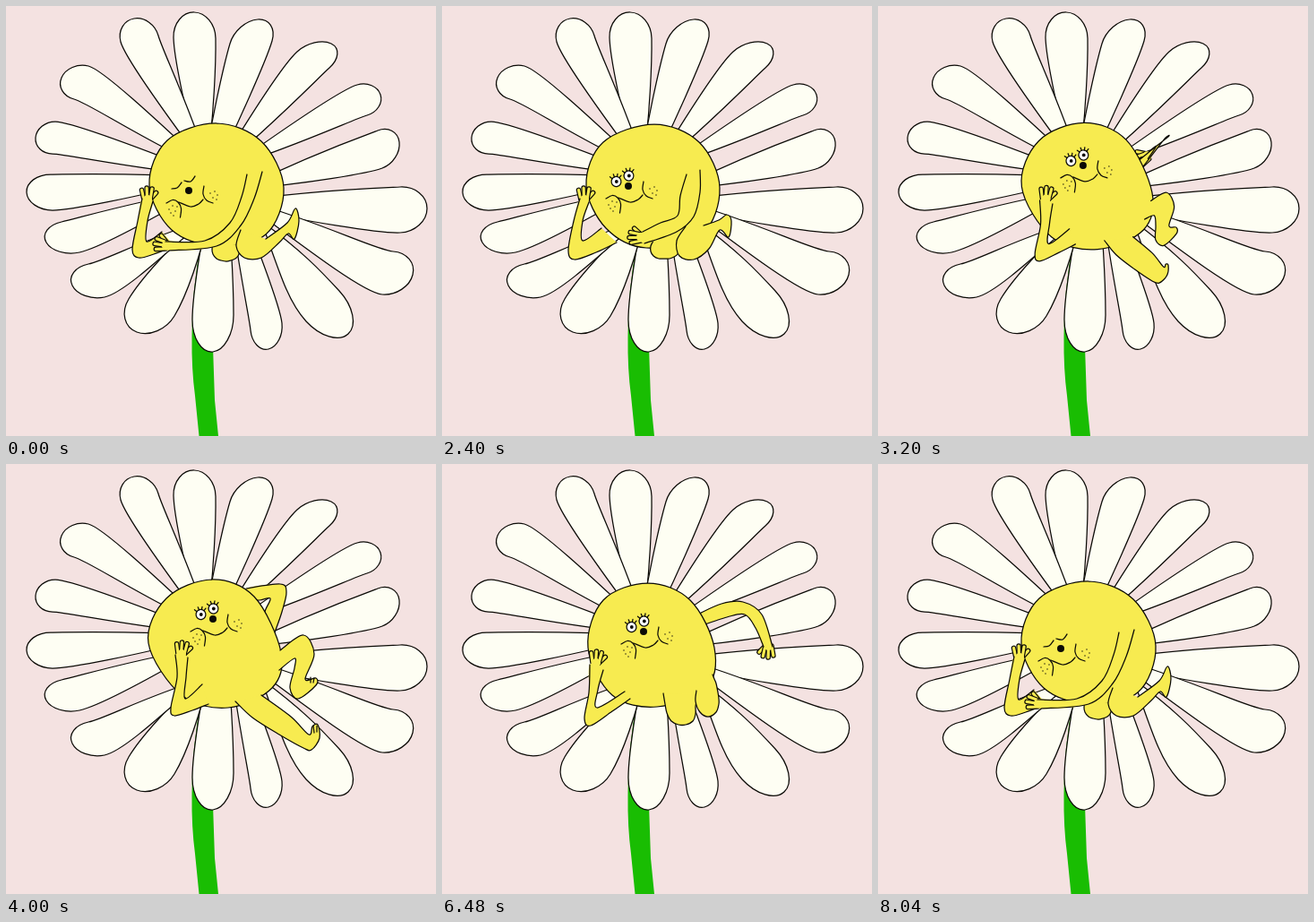
An HTML page with a canvas that plays this animation: 480 px wide and 480 px high, repeating every 9.44 s.

```html
<!DOCTYPE html>
<html lang="en">
<head>
<meta charset="utf-8">
<title>Daisy</title>
<style>
html, body { margin: 0; width: 100%; height: 100%; overflow: hidden; background: #f4e2e1; }
canvas { display: block; width: 100vw; height: 100vh; }
</style>
</head>
<body>
<canvas id="stage" width="480" height="480"></canvas>
<script>
const ctx = document.getElementById('stage').getContext('2d');
const LOOP = 9440;
const INK = '#0b0a06', YELLOW = '#f7eb50', PETAL = '#fefef3', GREEN = '#19bd02', BG = '#f4e2e1';

// Each petal: root, one shoulder, tip, other shoulder
const petals = [
  [222,200, 187,35, 210,7, 234,36],
  [215,220, 250,42, 281,15, 297,39],
  [235,185, 325,51, 363,42, 361,69],
  [250,180, 392,88, 418,99, 403,122],
  [260,205, 415,139, 439,152, 420,181],
  [240,220, 440,202, 470,226, 440,253],
  [260,215, 432,274, 454,300, 420,322],
  [285,240, 372,318, 382,366, 335,352],
  [245,180, 308,354, 293,383, 273,362],
  [240,150, 254,345, 231,386, 208,350],
  [230,225, 188,346, 146,364, 137,327],
  [220,240, 110,325, 74,312, 92,288],
  [220,205, 82,275, 45,264, 62,241],
  [230,192, 52,228, 23,208, 50,188],
  [230,190, 52,165, 33,147, 55,129],
  [230,185, 76,104, 62,80, 92,67],
  [230,190, 128,40, 143,14, 170,33]
];

// Poses share point counts, so any two can be blended
const asleep = {
  body: [235,131, 285,151, 310,203, 290,255, 235,268, 185,250, 160,200, 180,150],
  legL: [232,264, 230,271, 231,277, 235,282, 240,284, 246,285, 251,284, 256,282, 259,279, 261,274, 262,267],
  legR: [262,250, 257,268, 266,281, 285,281, 305,264, 315,254, 322,260, 327,240, 323,226, 314,242, 290,260],
  armL: [188,268, 165,277, 148,281, 141,272, 147,240, 152,215, 164,218, 158,240, 157,263, 174,252],
  armR: [286,185, 277,215, 262,245, 235,268, 182,273, 178,263, 222,262, 250,242, 263,213, 269,188],
  handL: [158,216, -1.6], handR: [179,267, 3.3], nose: [204,206]
};
const awake = {
  body: [237,132, 287,152, 310,203, 290,255, 228,270, 183,248, 161,200, 180,152],
  legL: [236,262, 233,268, 233,274, 236,279, 242,282, 248,282, 254,282, 259,280, 263,277, 265,271, 266,264],
  legR: [272,246, 262,262, 265,279, 281,283, 298,271, 310,250, 320,258, 323,240, 318,233, 309,239, 292,245],
  armL: [195,264, 172,275, 148,283, 141,273, 147,240, 154,215, 164,219, 157,240, 157,262, 178,248],
  armR: [288,183, 288,208, 281,235, 262,252, 226,265, 224,252, 244,242, 263,234, 266,212, 273,188],
  handL: [159,216, -1.6], handR: [222,258, 3.14], nose: [208,201]
};
const stretch = {
  body: [230,133, 277,152, 304,205, 295,250, 240,271, 190,258, 163,205, 180,152],
  legL: [247,256, 249,268, 251,278, 256,287, 264,291, 272,291, 280,287, 283,279, 283,271, 284,264, 284,257],
  legR: [284,253, 283,265, 288,277, 297,282, 306,277, 309,268, 309,262, 308,255, 306,245, 304,240, 302,235],
  armL: [210,262, 190,276, 166,292, 159,284, 164,255, 165,224, 180,230, 174,252, 173,272, 204,254],
  armR: [285,168, 312,156, 336,154, 357,168, 369,204, 359,204, 350,183, 338,168, 318,171, 285,182],
  handL: [172,222, -1.5], handR: [364,203, 1.6], nose: [225,187]
};
const lounge = {
  body: [230,129, 277,148, 307,210, 297,250, 248,272, 196,258, 159,200, 179,150],
  legL: [256,265, 275,283, 305,302, 332,317, 341,319, 350,306, 348,291, 342,293, 338,302, 318,282, 285,258],
  legR: [305,230, 322,217, 322,228, 317,250, 326,262, 346,247, 346,239, 334,240, 344,212, 332,191, 306,208],
  armL: [226,268, 208,275, 188,281, 184,272, 191,238, 189,213, 203,216, 201,238, 200,262, 219,246],
  armR: [300,188, 308,165, 313,143, 306,134, 268,139, 270,152, 283,152, 295,150, 290,162, 285,175],
  handL: [196,212, -1.5], handR: [266,148, 3.14], nose: [231,173]
};
const poses = [asleep, awake, stretch, lounge];

const poseKeys = [[0,0],[40,0],[1000,1],[2400,1],[2860,2],[2960,2],[3360,3],[5720,3],[6360,2],[6520,2],[6840,1],[7560,0],[LOOP,0]];
const eyeKeys = [[0,0],[600,0],[760,1],[1880,1],[1960,0],[2080,0],[2200,1],[3400,1],[3480,0],[3560,0],[3680,1],
  [4280,1],[4400,0],[4520,0],[4640,1],[4920,1],[5000,0],[5080,0],[5160,1],[5320,1],[5400,.6],[5760,.6],[5900,1],[6900,1],[7060,0],[LOOP,0]];

const mix = (a, b, k) => a + (b - a) * k;
const ease = k => k * k * (3 - 2 * k);

function track(keys, t) {
  let i = 0;
  while (i < keys.length - 2 && t >= keys[i + 1][0]) i++;
  const [t0, a] = keys[i], [t1, b] = keys[i + 1];
  return mix(a, b, ease((t - t0) / (t1 - t0)));
}

function blend(p) {
  const i = Math.min(2, Math.floor(p)), a = poses[i], b = poses[i + 1], out = {};
  for (const part in a) out[part] = a[part].map((v, n) => mix(v, b[part][n], p - i));
  return out;
}

// Smooth curve through flat x,y pairs
function curve(v, closed) {
  const n = v.length / 2;
  const at = i => {
    i = closed ? (i + n) % n : Math.max(0, Math.min(n - 1, i));
    return [v[2 * i], v[2 * i + 1]];
  };
  const path = new Path2D();
  path.moveTo(v[0], v[1]);
  for (let i = 0; i < (closed ? n : n - 1); i++) {
    const [a, b, c, d] = [at(i - 1), at(i), at(i + 1), at(i + 2)];
    path.bezierCurveTo(b[0] + (c[0] - a[0]) / 6, b[1] + (c[1] - a[1]) / 6,
      c[0] - (d[0] - b[0]) / 6, c[1] - (d[1] - b[1]) / 6, c[0], c[1]);
  }
  return path;
}

function shape(v, closed) {
  const path = curve(v, closed);
  ctx.fillStyle = YELLOW;
  ctx.fill(path);
  ctx.stroke(path);
}

function line(...v) { ctx.stroke(curve(v)); }

function dot(x, y, r) {
  ctx.fillStyle = INK;
  ctx.beginPath();
  ctx.arc(x, y, r, 0, 7);
  ctx.fill();
}

function drawPetal([bx, by, lx, ly, tx, ty, rx, ry]) {
  const mx = (lx + rx) / 2, my = (ly + ry) / 2, ux = tx - mx, uy = ty - my;
  const bulge = (x, y) => [mix(bx, x, .5) + (x - mx) * .22, mix(by, y, .5) + (y - my) * .22];
  const [ax, ay] = bulge(lx, ly), [cx, cy] = bulge(rx, ry);
  ctx.beginPath();
  ctx.moveTo(bx, by);
  ctx.bezierCurveTo(ax, ay, lx - ux * .7, ly - uy * .7, lx, ly);
  ctx.bezierCurveTo(lx + ux * .55, ly + uy * .55, tx + (lx - mx) * .55, ty + (ly - my) * .55, tx, ty);
  ctx.bezierCurveTo(tx + (rx - mx) * .55, ty + (ry - my) * .55, rx + ux * .55, ry + uy * .55, rx, ry);
  ctx.bezierCurveTo(rx - ux * .7, ry - uy * .7, cx, cy, bx, by);
  ctx.fillStyle = PETAL;
  ctx.fill();
  ctx.stroke();
}

function drawStem() {
  ctx.fillStyle = GREEN;
  ctx.fill(new Path2D('M218 262 Q207 320 207.500 370 Q207 405 211 435 L215.500 480 H237 L233 440 L231 380 L232 262 Z'));
}

function drawHand([x, y, angle]) {
  const finger = (turn, side, len) => {
    const c = Math.cos(angle), s = Math.sin(angle);
    const fx = x - s * side, fy = y + c * side;
    ctx.beginPath();
    ctx.moveTo(fx, fy);
    ctx.lineTo(fx + Math.cos(angle + turn) * len, fy + Math.sin(angle + turn) * len);
    ctx.lineWidth = 5.6;
    ctx.stroke();
    ctx.strokeStyle = YELLOW;
    ctx.lineWidth = 3.2;
    ctx.stroke();
    ctx.strokeStyle = INK;
  };
  finger(.75, 3, 10);
  finger(-.2, -4, 11);
  finger(.2, 3, 12);
  finger(0, -.5, 13);
  ctx.lineWidth = 1.25;
  ctx.fillStyle = YELLOW;
  ctx.beginPath();
  ctx.arc(x, y, 5, 0, 7);
  ctx.fill();
}

function drawArm(v, split, hand) {
  drawHand(hand);
  ctx.fillStyle = YELLOW;
  ctx.fill(curve(v));
  line(...v.slice(0, split * 2));
  line(...v.slice(split * 2));
}

function drawEye(x, y, open) {
  if (open < .15) {
    line(x - 5, y, x, y + 2, x + 5, y - 2);
    return;
  }
  ctx.beginPath();
  ctx.ellipse(x, y, 5.4, 5.6 * open, -.25, 0, 7);
  ctx.fillStyle = '#fff';
  ctx.fill();
  ctx.stroke();
  dot(x + .3, y, 1.9 * Math.min(1, open + .2));
  if (open < .8) return;
  for (const a of [-2.5, -1.95, -1.4, -.9]) {
    const c = Math.cos(a), s = Math.sin(a);
    line(x + c * 5.6, y + s * 5.6, x + c * 8.8, y + s * 8.8);
  }
}

function drawFace([x, y], open, sleepy) {
  ctx.save();
  ctx.translate(x, y);
  if (sleepy) {
    line(-19, -2, -13, -3, -8, -9);
    line(-5, -11, 2, -10, 7, -16);
  } else {
    drawEye(-13.5, -5, open);
    drawEye(.5, -11.5, open);
  }
  dot(0, 0, 4);
  line(-11, 13, 2, 18, 11, 15, 16, 10);
  line(-25, 14, -18, 10.5, -12, 13, -8.5, 20, -9.5, 30);
  line(17, -5, 16, 4, 20, 11, 27, 14);
  const freckles = [-22,21, -18,17, -20,25, -15,23, -13,18, -17,28, 24,3, 29,1, 27,8, 32,5, 31,10];
  for (let i = 0; i < freckles.length; i += 2) dot(freckles[i], freckles[i + 1], .7);
  ctx.restore();
}

function drawToes() {
  line(343, 292, 344, 300);
  line(347, 292, 347, 299);
  line(340, 238, 340, 244);
  line(344, 239, 343, 244);
}

function draw(t) {
  const p = track(poseKeys, t), open = track(eyeKeys, t), pose = blend(p);
  const armBehind = p > 1.5;
  ctx.fillStyle = BG;
  ctx.fillRect(0, 0, 480, 480);
  ctx.strokeStyle = INK;
  ctx.lineWidth = 1.25;
  ctx.lineCap = ctx.lineJoin = 'round';
  drawStem();
  petals.forEach(drawPetal);
  if (armBehind) drawArm(pose.armR, 5, pose.handR);
  shape(pose.body, true);
  shape(pose.legL);
  shape(pose.legR);
  if (p > 2.9) drawToes();
  drawFace(pose.nose, open, p < .8 && open < .15);
  drawArm(pose.armL, 6, pose.handL);
  if (!armBehind) drawArm(pose.armR, 5, pose.handR);
}

function tick() {
  // The drawing advances on 40 ms steps
  draw(Math.floor(performance.now() % LOOP / 40) * 40);
  requestAnimationFrame(tick);
}
tick();
</script>
</body>
</html>
```
